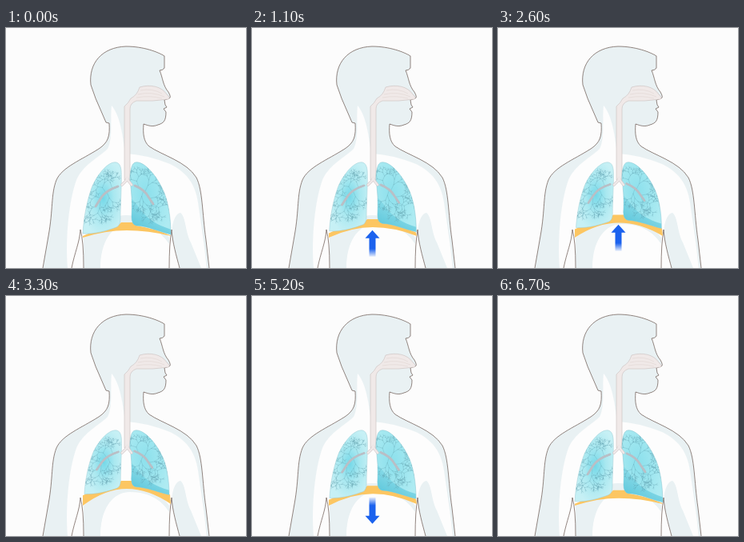
Recreate the animation shown at these times as an HTML page. Size 300x300 px, loop 6.8 s.

```html
<!DOCTYPE html>
<html lang="en">
<head>
<meta charset="utf-8">
<title>Breathing</title>
<style>
  html, body { margin: 0; width: 100%; height: 100%; overflow: hidden; background: #fcfcfc; }
  svg { display: block; width: 100vw; height: 100vh; }
  .line { fill: none; stroke: #65524b; stroke-width: .7; stroke-linejoin: round; }
  .tissue { fill: #f0e9e8; stroke: #c9bfbe; stroke-width: .6; }
  .vein { fill: none; stroke: #5a97a6; stroke-width: .32; stroke-linecap: round; }
  .bronchus { fill: none; stroke-linecap: round; }
</style>
</head>
<body>
<svg viewBox="0 0 300 300">
  <defs>
    <path id="body" d="M46 300L53 260C59 227 56 208 63 190C70 174 94 165 116 151C128 143 130 135 129 119L125 118L112 88L106 71C103 44 120 24 150 23C172 23 190 30 198 35V50Q196 53 192 53C196 62 196 72 203 80Q207 87 204 88L198 90L199 96L201 99L197 101L200 105C200 116 197 119 190 121C183 124 178 122 172 120C171 132 172 142 179 148C195 159 226 167 238 187C246 203 245 230 250 265L254 300"/>
    <path id="leftLung" d="M138 168C127 166 113 185 107 200C100 220 97 240 96 257C112 258 127 253 138 249Q143 247 143 238C143 220 145 190 144 178Q143 169 138 168Z"/>
    <path id="rightLung" d="M162 168C157 168 155 180 155 190C157 205 158 220 157 236Q157 246 163 247C178 248 190 254 206 258C206 238 203 215 195 200C187 183 172 166 162 168Z"/>
    <clipPath id="bodyClip"><use href="#body"/></clipPath>
    <clipPath id="leftClip"><use href="#leftLung"/></clipPath>
    <clipPath id="rightClip"><use href="#rightLung"/></clipPath>
    <radialGradient id="leftFill" cx=".53" cy=".5" r=".55">
      <stop stop-color="#74d8e8"/><stop offset=".5" stop-color="#a9e8f0"/><stop offset="1" stop-color="#c6f0f5"/>
    </radialGradient>
    <radialGradient id="rightFill" cx=".4" cy=".45" r=".65">
      <stop stop-color="#8ce0ec"/><stop offset="1" stop-color="#aeebf2"/>
    </radialGradient>
    <linearGradient id="lobe" x1="0" y1="1" x2=".6" y2="0">
      <stop offset=".1" stop-color="#54c3d9"/><stop offset="1" stop-color="#9fe4ed"/>
    </linearGradient>
    <linearGradient id="arrowFill" x2="0" y2="1">
      <stop offset=".7" stop-color="#1b62ee"/><stop offset="1" stop-color="#1b62ee" stop-opacity=".1"/>
    </linearGradient>
  </defs>

  <g clip-path="url(#bodyClip)">
    <rect width="300" height="300" fill="#e9f1f3"/>
    <path fill="#fdfdfd" d="M132 97C130 115 134 138 127 151C115 163 97 170 88 190C79 215 74 260 77 300H251C247 262 243 240 240 218C237 196 226 180 205 170Q175 158 149 157C146 135 143 110 132 97Z"/>
    <path fill="#e9f1f3" d="M207 256C208 240 213 231 218 231C225 236 224 255 231 268L244 300H207Z"/>
    <path fill="#e9f1f3" d="M97 262C110 250 128 234 150 234C175 234 195 248 204 262V270C195 256 180 245 155 245C132 245 118 268 118 300H97Z"/>
    <path fill="#fcfcfc" d="M93 252C92 268 86 280 82 300H97V275ZM207 252C208 268 213 285 217 300H204Z"/>
  </g>
  <use href="#body" class="line"/>
  <path class="line" d="M82 300C86 280 92 268 93 252Q97 266 97 300M217 300C213 285 208 268 207 252Q204 270 204 300"/>

  <path id="diaphragm" fill="#fcc662"/>

  <path class="tissue" d="M148 190V98Q153 94 156 88Q164 84 167 74C180 70 195 73 201 83Q206 87 203 89Q184 92 163 91Q155 94 155 101V190Z"/>
  <path fill="none" stroke="#e3d8d6" stroke-width=".7" d="M168 78Q183 75 195 82M165 83Q182 79 198 86M163 87Q180 84 195 88"/>

  <g id="lungs">
    <use href="#leftLung" fill="url(#leftFill)" stroke="#9bcbd3" stroke-width=".5"/>
    <use href="#rightLung" fill="url(#rightFill)" stroke="#82c1cd" stroke-width=".5"/>
    <path clip-path="url(#rightClip)" fill="url(#lobe)" d="M155 212C169 222 168 240 207 252V262H155Z"/>
    <path id="leftVeins" class="vein" clip-path="url(#leftClip)" opacity=".8"/>
    <path id="rightVeins" class="vein" clip-path="url(#rightClip)" opacity=".8"/>
    <g class="bronchus">
      <path id="tubes" stroke="#b9bfc6" stroke-width="2.600" d="M140 198Q125 203 119 212L112 223M161 197Q173 202 178 211L184 220"/>
      <use href="#tubes" style="stroke:#e9e8ec;stroke-width:1.800"/>
    </g>
  </g>
  <path class="bronchus" stroke="#c9c1c2" stroke-width="3.400" d="M151.500 188L150 191L145 196M151.500 188L153 191L157 196"/>
  <path class="bronchus" stroke="#efe8e8" stroke-width="2.600" d="M151.500 187L150 191L145 196M151.500 187L153 191L157 196"/>

  <path id="arrow" fill="url(#arrowFill)" d="M0 0L9 10H4V33H-4V10H-9Z"/>
</svg>
<script>
const el = id => document.getElementById(id);
const LOOP = 6800, HALF = LOOP / 2, STEP = 100;

function randomizer(seed) {
  return () => (seed = seed * 16807 % 2147483647) / 2147483647;
}

// Branching vessels grown from points along each bronchus.
function veins(seed, roots) {
  const rnd = randomizer(seed);
  let d = "";
  function grow(x, y, angle, length, depth) {
    const bend = angle + (rnd() - .5) * .8;
    const nx = x + Math.cos(bend) * length, ny = y + Math.sin(bend) * length;
    d += `M${x.toFixed(1)} ${y.toFixed(1)}L${nx.toFixed(1)} ${ny.toFixed(1)}`;
    if (!depth) return;
    for (const side of [-1, 1])
      grow(nx, ny, bend + side * (.3 + rnd() * .6), length * (.68 + rnd() * .2), depth - 1);
  }
  for (const [x, y, angle] of roots) grow(x, y, angle, 8, 5);
  return d;
}

el("leftVeins").setAttribute("d", veins(71, [
  [133, 201, -1.5], [125, 206, -2.2], [120, 213, -2.8],
  [114, 222, 2.3], [118, 217, 1.4], [126, 205, 1.2]
]));
el("rightVeins").setAttribute("d", veins(29, [
  [166, 199, -1.5], [174, 204, -1], [179, 213, -.3],
  [184, 220, .8], [180, 215, 1.5], [172, 203, 1.7]
]));

const clamp = v => Math.max(0, Math.min(1, v));

function draw(now) {
  const t = Math.floor(now % LOOP / STEP) * STEP;
  const exhaling = t < HALF;
  const phase = (exhaling ? t : t - HALF) / HALF;
  const squeeze = exhaling ? phase : 1 - phase;
  const sx = 1 - .037 * squeeze, sy = 1 - .11 * squeeze;
  el("lungs").setAttribute("transform",
    `translate(150 168) scale(${sx} ${sy}) translate(-150 -168)`);

  const top = 243 - 12.4 * squeeze, side = 260 - 11 * squeeze, low = top + 10;
  el("diaphragm").setAttribute("d",
    `M96 262V${side}Q118 ${top + 7} 139 ${top + 5}L144 ${top}H159L163 ${top + 4}` +
    `Q183 ${top + 7} 205 ${side - 1}L206 260Q178 ${low} 151 ${low}Q124 ${low} 96 262Z`);

  const tip = exhaling ? 258 - 16 * phase : 274.5 + 19.5 * phase;
  const arrow = el("arrow");
  arrow.setAttribute("transform", `translate(150.5 ${tip}) scale(1 ${exhaling ? 1 : -1})`);
  arrow.setAttribute("opacity", clamp(phase * 6) * clamp((.97 - phase) * 6));
  requestAnimationFrame(() => draw(performance.now() - start));
}

const start = performance.now();
draw(0);
</script>
</body>
</html>
```
